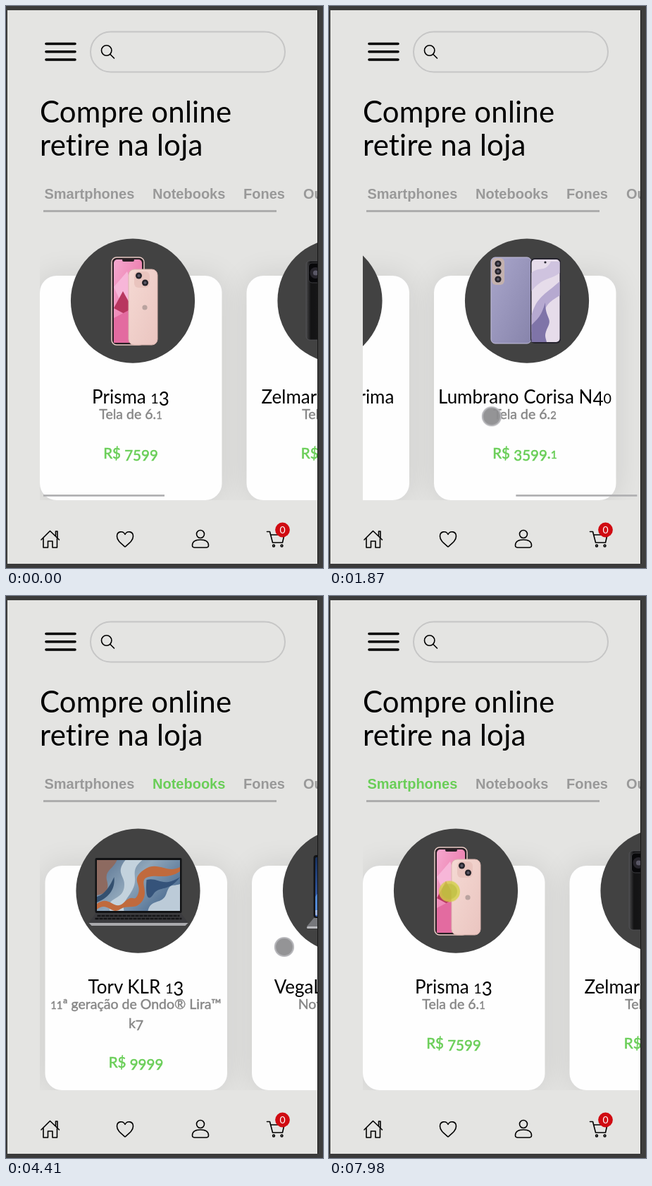
An HTML page for the animation above (8000 ms loop, 450 by 796 pixels).

```html
<!DOCTYPE html>
<html lang="pt-BR">
<head>
<meta charset="utf-8">
<title>Loja</title>
<style>
@property --s { syntax: '<number>'; inherits: true; initial-value: 0; }
html, body { margin: 0; width: 450px; height: 796px; overflow: hidden; background: #3a3a3a; }
#stage { display: block; animation: scroll 8s linear infinite; }
text { font-family: Lato, sans-serif; font-variant-ligatures: none; white-space: pre; }
.head { font-size: 42px; letter-spacing: .2px; }
.tab { font: bold 20px "Liberation Sans", Arial, sans-serif; fill: #999; }
.line { fill: none; stroke: #000; stroke-width: 1.6; stroke-linecap: round; stroke-linejoin: round; }
.title { font-size: 26px; }
.sub { font-size: 19.5px; fill: #868686; stroke: #868686; stroke-width: .45px; }
.price { font-size: 20.5px; fill: #6ace58; stroke: #6ace58; stroke-width: .6px; }
.small { font-size: .76em; }
.low { baseline-shift: -.13em; }
.shade { filter: blur(22px); }

#track { transform: translateX(calc(var(--s) * -1px)); }
#bar { transform: translateX(calc(var(--s) * .437px)); animation: bar 8s linear infinite; }
#cursor { animation: move 8s linear infinite; }
#press { animation: press 8s step-end infinite; }
#release { animation: release 8s step-end infinite; }
#phones { animation: phones 8s step-end infinite; }
#laptops { animation: laptops 8s step-end infinite; }
#tabA { animation: tabA 8s step-end infinite; }
#tabB { animation: tabB 8s step-end infinite; }

@keyframes scroll {
  0%, 9.125% { --s: 0; }
  14.875% { --s: 290; }
  15.75% { --s: 319; animation-timing-function: ease-out; }
  20.6%, 24.4% { --s: 486; }
  29.125% { --s: 404.5; }
  30.6% { --s: 345; animation-timing-function: ease-out; }
  34.4%, 61.25% { --s: 286; }
  67% { --s: 101; }
  68.2% { --s: 62; animation-timing-function: ease-out; }
  71.5%, 100% { --s: 0; }
}
@keyframes move {
  0%, 2.375% { transform: translate(396px, 728px); }
  4.75% { transform: translate(360px, 655px); }
  7.375%, 9.125% { transform: translate(375px, 586px); }
  14.875% { transform: translate(85px, 604px); }
  15.75% { transform: translate(70px, 605px); }
  18.1% { transform: translate(66px, 604px); animation-timing-function: ease-in-out; }
  24.4% { transform: translate(240px, 580px); }
  29.125% { transform: translate(321.5px, 569.5px); }
  30.6% { transform: translate(381px, 562px); }
  32% { transform: translate(395px, 540px); animation-timing-function: ease-in-out; }
  38.625% { transform: translate(262px, 273px); }
  46.875% { transform: translate(262px, 273px); animation-timing-function: ease-in-out; }
  55.125% { transform: translate(395px, 497px); }
  56.75% { transform: translate(380px, 505px); }
  61.25% { transform: translate(163px, 515px); }
  67% { transform: translate(348px, 510px); }
  68.2% { transform: translate(387px, 508px); animation-timing-function: ease-in-out; }
  72.9% { transform: translate(190px, 508px); }
  75.6% { transform: translate(255.5px, 505px); }
  78.9% { transform: translate(255.5px, 505px); animation-timing-function: ease-in-out; }
  86.25% { transform: translate(130px, 264px); }
  91.375% { transform: translate(130px, 264px); animation-timing-function: ease-in-out; }
  97.25%, 100% { transform: translate(171px, 418.5px); }
}
@keyframes press {
  0%, 15.7%, 30.7%, 42.75%, 68.2%, 78.875%, 88.875% { opacity: 0; }
  9.125%, 24.4%, 41.125%, 61.25%, 72.9%, 87.25%, 99.75% { opacity: 1; }
}
@keyframes release {
  0%, 9.125%, 24.4%, 41.125%, 61.25%, 72.9%, 87.25%, 99.75% { opacity: 0; }
  2.375%, 15.7%, 30.7%, 42.75%, 68.2%, 78.875%, 88.875% { opacity: 1; }
}
@keyframes bar {
  0%, 35% { opacity: 1; }
  38.1%, 61.24% { opacity: 0; }
  61.25%, 80.6% { opacity: 1; }
  83.75%, 100% { opacity: 0; }
}
@keyframes phones {
  0%, 91.375% { visibility: visible; }
  46.875% { visibility: hidden; }
}
@keyframes laptops {
  0%, 91.375% { visibility: hidden; }
  46.875% { visibility: visible; }
}
@keyframes tabA {
  0% { fill: #999; }
  88.875%, 100% { fill: #6ace58; }
}
@keyframes tabB {
  0%, 88.875% { fill: #999; }
  42.75% { fill: #6ace58; }
}
</style>
</head>
<body>
<svg id="stage" width="450" height="796" viewBox="0 0 450 796">
  <defs>
    <clipPath id="view"><rect x="48" y="320" width="394" height="380"/></clipPath>
    <linearGradient id="pink" x2="1" y2="1">
      <stop stop-color="#f5a8cf"/><stop offset=".5" stop-color="#ee86b4"/><stop offset="1" stop-color="#f6c0d4"/>
    </linearGradient>
    <linearGradient id="rose" x2="1" y2="1">
      <stop stop-color="#f5d9d3"/><stop offset="1" stop-color="#eac5c0"/>
    </linearGradient>
    <linearGradient id="black" x2="1">
      <stop stop-color="#4a4a4c"/><stop offset=".15" stop-color="#131314"/><stop offset="1" stop-color="#1f1f21"/>
    </linearGradient>
    <linearGradient id="peak" x2="0" y2="1">
      <stop stop-color="#5d6780"/><stop offset=".5" stop-color="#7883a0"/><stop offset="1" stop-color="#20283a"/>
    </linearGradient>
    <linearGradient id="lilac" x2="1" y2="1">
      <stop stop-color="#a9a6cb"/><stop offset="1" stop-color="#8784ab"/>
    </linearGradient>
    <linearGradient id="fire" x2="1" y2="1">
      <stop stop-color="#2a090d"/><stop offset=".35" stop-color="#c4221a"/><stop offset=".6" stop-color="#dd3a1e"/><stop offset="1" stop-color="#2a0a0e"/>
    </linearGradient>
    <linearGradient id="sea" x2="1" y2=".6">
      <stop stop-color="#56708f"/><stop offset=".5" stop-color="#8fa6ba"/><stop offset="1" stop-color="#4d6d92"/>
    </linearGradient>
    <linearGradient id="night" x2="1" y2="1">
      <stop stop-color="#17305c"/><stop offset=".5" stop-color="#3f6bc0"/><stop offset="1" stop-color="#7a3f86"/>
    </linearGradient>
  </defs>

  <rect width="450" height="796" fill="#3a3a3a"/>
  <rect x="2" y="6" width="440" height="784" fill="#e4e4e2"/>

  <path class="line" style="stroke-width:3.6" d="M57 53.500H98M57 64.700H98M57 76H98"/>
  <rect x="120" y="36.500" width="276" height="57" rx="28.500" fill="none" stroke="#c6c6c6" stroke-width="2"/>
  <g class="line"><circle cx="142.700" cy="63" r="7.200"/><path d="M148 68.500L153.500 74"/></g>

  <text class="head" x="48" y="165">Compre online</text>
  <text class="head" x="48" y="212">retire na loja</text>

  <text class="tab" id="tabA" x="54.500" y="273">Smartphones</text>
  <text class="tab" id="tabB" x="208" y="273">Notebooks</text>
  <text class="tab" x="337" y="273">Fones</text>
  <text class="tab" x="422" y="273">Outros</text>
  <rect x="53" y="289" width="331" height="3" fill="#adadad"/>

  <g clip-path="url(#view)">
    <g id="track"><g id="bases"></g><g id="phones"></g><g id="laptops"></g></g>
    <rect id="bar" x="53" y="692" width="172" height="2.700" fill="#b0b0b2"/>
  </g>

  <g class="line">
    <path d="M50 756L62.500 743.500L75.500 756M53 754V767H59.500V758H66V767H72.500V754M70.500 750V744H73V753"/>
    <path d="M169 766C163 761 157.500 757 157.500 751C157.500 744 166 742.500 169 748.500C172 742.500 180.500 744 180.500 751C180.500 757 175 761 169 766Z"/>
    <circle cx="276" cy="748" r="5.500"/>
    <path d="M264.500 764C264.500 758 269 756 276 756S287.500 758 287.500 764Q287.500 767 284 767H268Q264.500 767 264.500 764Z"/>
    <path d="M370.500 744.500H374.500L378.500 760H392.500L395 749H376"/>
    <circle cx="380" cy="764.500" r="1.400"/><circle cx="391.500" cy="764.500" r="1.400"/>
  </g>
  <circle cx="392.500" cy="742" r="10.400" fill="#d00b12"/>
  <text x="392.500" y="746.500" text-anchor="middle" font-size="14" fill="#fff">0</text>

  <rect x="442" width="8" height="796" fill="#3d3d3d"/>
  <rect x="442" y="6" width="1" height="784" fill="#161616"/>

  <g id="cursor">
    <g id="release">
      <circle r="13" fill="#8c8c8e" fill-opacity=".93" stroke="#b5b5b9" stroke-width="2.200"/>
    </g>
    <g id="press">
      <circle r="15" fill="#d3d148" fill-opacity=".82"/>
      <circle r="11" fill="#b9ba3c" fill-opacity=".6"/>
    </g>
  </g>
</svg>
<script>
const PITCH = 293.5;
const byId = id => document.getElementById(id);
const box = (x, y, w, h, r, fill, more = '') =>
  `<rect x="${x}" y="${y}" width="${w}" height="${h}" rx="${r}" fill="${fill}" ${more}/>`;
const shape = (d, fill, more = '') => `<path d="${d}" fill="${fill}" ${more}/>`;
const dot = (x, y, r, fill) => `<circle cx="${x}" cy="${y}" r="${r}" fill="${fill}"/>`;
const lens = (x, y, r) => dot(x, y, r, '#26242b') + dot(x, y, r * .45, '#5a5866');

// Old-style figures: short 0-2, hanging 3, 4, 5, 7, 9
const figures = s => s.replace(/[0-579]/g, d =>
  `<tspan class="${d < '3' ? 'small' : 'low'}">${d}</tspan>`);
const label = (kind, y, s) =>
  `<text class="${kind}" x="129" y="${y}" text-anchor="middle">${figures(s)}</text>`;

const rosePhone =
  box(-30, -62, 46, 124, 7, '#2b2025', 'stroke="#e8cbc5" stroke-width="1.5"') +
  box(-27, -59, 40, 118, 5, 'url(#pink)') +
  shape('M-27-20L-8-42L4-10L-14 8Z', '#f7b6d8') +
  shape('M-27 10L-14-14L-4 4L-8 20Z', '#b8365f') +
  shape('M-27 59L-27 24L-4 12V59Z', '#e36ba0') +
  box(-15, -60, 17, 4, 2, '#2b2025') +
  box(-6, -45, 41, 107, 8, 'url(#rose)', 'stroke="#d9b3ad" stroke-width="1"') +
  box(2, -42, 22, 23, 6, '#e9c4be') + lens(8.5, -36, 4.5) + lens(17.5, -26, 4.5) +
  dot(17, 9, 3.6, '#b9a39f');

const blackPhone =
  box(-47.5, -57, 45, 112, 5, 'url(#black)', 'stroke="#55555a" stroke-width=".8"') +
  box(-44, -54, 40, 28, 5, '#08080a', 'stroke="#3c3c40" stroke-width="1"') +
  lens(-34, -40, 8) + lens(-18, -45, 4.5) + lens(-18, -34, 4) +
  box(-12, -47, 7, 14, 1, '#8a7a58') +
  box(-3.5, -57, 50, 112, 5, '#15171d') +
  box(-2, -55, 47, 108, 4, 'url(#peak)') +
  shape('M-2 2C8-18 14-30 22-20S36-20 45-34V-16C34-4 30 10 20 2S6 10-2 24Z', '#b4bccd') +
  shape('M45-8C32 0 30 22 16 26C28 30 38 22 45 12Z', '#d5dae4') +
  shape('M-2 53V30L16 14L30 36L45 20V53Z', '#333d57') +
  shape('M14 53L30 30L38 42L45 34V53Z', '#1e2538') +
  `<text transform="translate(9 55) rotate(-90)" font-size="14.500" font-weight="700" fill="#eef0f5">Vo 12 PRIMA</text>`;

const lilacPhone =
  box(-51, -62, 57, 122, 6, 'url(#lilac)', 'stroke="#c4c0dc" stroke-width="1"') +
  box(-50, -61, 18, 38, 6, '#c3b1ae') +
  [-53, -42, -31].map(y => lens(-41, y, 4.6)).join('') +
  box(5, -61, 43, 121, 6, '#26242e') +
  box(6.5, -59, 40, 117, 5, '#e6dcea') +
  shape('M6.5-40C18-50 26-40 34-56H46.500V-40C34-30 22-34 6.500-14Z', '#cfc3df') +
  shape('M6.5 20C14-6 24-8 46.500-28V-8C34 0 26 4 24 20S14 34 6.500 44Z', '#b6a9d0') +
  shape('M6.5 58V34C16 24 20 22 26 2C26 24 36 24 30 36S26 50 28 58Z', '#7f74a8') +
  dot(26, -55, 1.6, '#26242e');

const keys = (x, w, y, n) => Array.from({ length: n }, (_, i) =>
  box(x - i * 1.5, y + i * 3.5, w + i * 3, 2, 0, '#6f6f72')).join('');

const silverLaptop =
  box(-28.500, -25, 58, 48, 2, '#1a1516') + box(-27, -23, 55, 43, 0, 'url(#fire)') +
  shape('M-27-6C-10-18 2 0 28-4V4C8 4-4 0-27 10Z', '#f2703a', 'opacity=".85"') +
  shape('M-20-8C-6-14 4 0 26 0C8 6-4-6-20-8Z', '#f9b690', 'opacity=".7"') +
  shape('M-27-23H6C-8-16-18-14-27-4Z', '#2b0b10') +
  shape('M-28 23H29L37 52H-35Z', '#c4c4c6') + keys(-25, 51, 26, 4) +
  box(-9, 43, 20, 8, 1, '#aeaeb1') + box(-35, 52, 72, 3.5, 1.5, '#dededf');

const wideLaptop =
  box(-61, -47, 123, 78, 2, '#111214') + box(-58.500, -44, 118, 72, 0, 'url(#sea)') +
  shape('M-58.500-44H-30C-36-30-48-30-44-14S-50 4-58.500 6Z', '#8d6a60') +
  shape('M-40 28C-46 8-24 14-20-4S-34-24-18-44H6C-14-28 2-20-8-2S-22 14-20 28Z', '#c3d2dd') +
  shape('M14 28C18 10 34 20 40 4S46-6 59.500-10V28Z', '#bccbd8') +
  shape('M-58.500 18C-40 4-34 30-20 16S-6 18 0 4S-12-16 8-30S40-24 59.500-34V-28C42-16 28-24 14-20S16 0 6 14S-14 18-26 26S-44 14-58.500 26Z', '#c06a3d') +
  shape('M12-16C30-20 34-4 59.500-20C44 2 30-8 22 4S10 8 12-16Z', '#35537a') +
  shape('M-58.500 8C-46 4-40-8-34-20C-32 0-44 10-58.500 16Z', '#34506f') +
  shape('M-60 31H61L71 45H-70Z', '#3c3c3f') +
  `<path d="M-58 35H59M-61 39H62" stroke="#151517" stroke-width="2.500" stroke-dasharray="5 1"/>` +
  shape('M-70 45H71L67 49H-66Z', '#a9a9ac');

const darkLaptop =
  box(-44.500, -51, 89, 89, 4, '#121316') + box(-42, -48, 84, 84, 2, 'url(#night)') +
  shape('M-42 8C-20-26 6 14 42-18V16C12 30-10 6-42 30Z', '#5f9be6', 'opacity=".7"') +
  box(-42, 27, 84, 7, 1, '#d5d9e4', 'opacity=".6"') +
  shape('M-44 38H44L54 50H-54Z', '#77787c') + box(-54, 50, 108, 3, 1.5, '#b8b9bd');

const card = ([title, subs, price, art], i) =>
  `<g transform="translate(${48 + PITCH * i} 0)">` +
  `<g transform="translate(132 418)">${art}</g>` +
  label('title', 563, title) +
  subs.map((s, n) => label('sub', 585 + 26.5 * n, s)).join('') +
  label('price', 614.5 + 26.5 * subs.length, price) + '</g>';

const phones = [
  ['Prisma 13', ['Tela de 6.1'], 'R$ 7599', rosePhone],
  ['Zelmar Vo 12 Prima', ['Tela de 6.81'], 'R$ 7962.99', blackPhone],
  ['Lumbrano Corisa N40', ['Tela de 6.2'], 'R$ 3599.1', lilacPhone]
];
const laptops = [
  ['Tarvos VelaNote 4e', ['Tela de 15.6'], 'R$ 2749.99', silverLaptop],
  ['Torv KLR 13', ['11ª geração de Ondo® Lira™', 'k7'], 'R$ 9999', wideLaptop],
  ['VegaLume Sol K1', ['Notebook 13.3'], 'R$ 9299', darkLaptop]
];

const xs = [0, 1, 2].map(i => 48 + PITCH * i);
byId('bases').innerHTML =
  xs.map(x => box(x, 382, 258.5, 318, 24, '#000', 'class="shade" opacity=".1"')).join('') +
  xs.map(x => box(x, 382, 258.5, 318, 24, '#fefefe') + dot(x + 132, 417.6, 88.1, '#424242')).join('');
byId('phones').innerHTML = phones.map(card).join('');
byId('laptops').innerHTML = laptops.map(card).join('');
</script>
</body>
</html>
```
